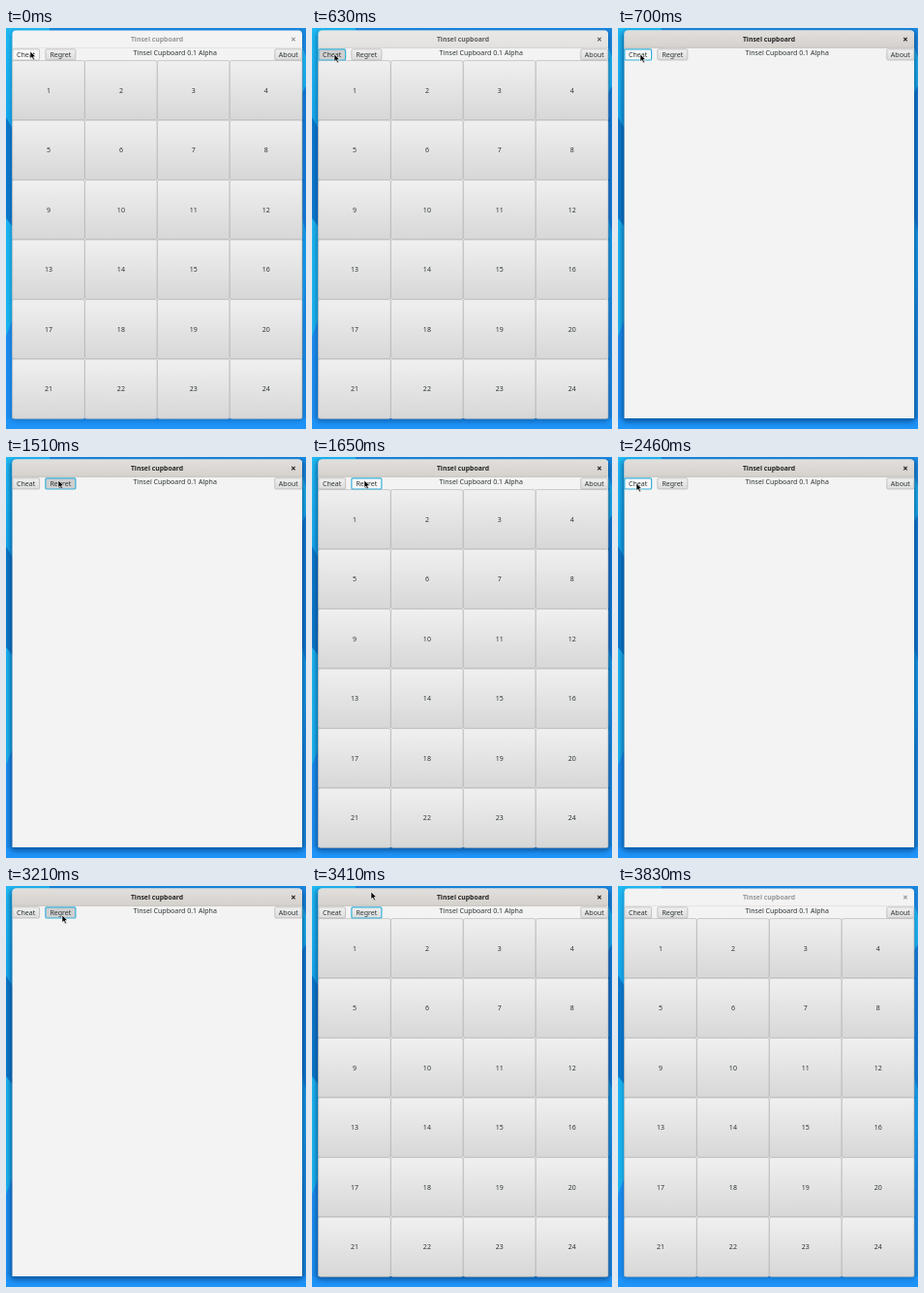
Recreate the animation shown at these times as an HTML page. Size 310x413 px, loop 3.86 s.

```html
<!DOCTYPE html>
<html lang="en">
<head>
<meta charset="utf-8">
<title>Tinsel cupboard</title>
<style>
  html, body { margin: 0; width: 100%; height: 100%; overflow: hidden; background: #1c8ff0; }
  svg { display: block; width: 310px; height: 413px; }
  text { font: 7.06px "Noto Sans", "Open Sans", sans-serif; fill: #2e3436; text-anchor: middle; }
  .title { font-weight: 700; font-size: 6.85px; }
  .shade { filter: blur(2.5px); }
</style>
</head>
<body>
<svg id="stage" viewBox="0 0 310 413">
  <defs>
    <linearGradient id="sky" x2="0" y2="1">
      <stop offset="0" stop-color="#20b9f2"/><stop offset=".22" stop-color="#17a9ee"/>
      <stop offset=".55" stop-color="#169be9"/><stop offset="1" stop-color="#2199fb"/>
    </linearGradient>
    <linearGradient id="bar" x2="0" y2="1">
      <stop stop-color="#e2dfdc"/><stop offset="1" stop-color="#d5d1cd"/>
    </linearGradient>
    <linearGradient id="cell" x2="0" y2="1">
      <stop stop-color="#f0f0f0"/><stop offset="1" stop-color="#d7d7d7"/>
    </linearGradient>
    <linearGradient id="btn" x2="0" y2="1">
      <stop stop-color="#f0f0f0"/><stop offset="1" stop-color="#dcdcdc"/>
    </linearGradient>
  </defs>

  <rect width="310" height="413" fill="url(#sky)"/>
  <path d="M45 0H310V413H300L310 250V30L300 4H45Z" fill="#1b88e0"/>
  <path d="M0 92L7 104V205L0 196Z" fill="#0c78cc"/>
  <path d="M0 196L7 205V300L0 318Z" fill="#1cb4f0"/>
  <path d="M0 318L7 300V413H0Z" fill="#1c8df0"/>
  <path d="M304 70L310 60V210L304 190Z" fill="#1379d4"/>
  <path d="M0 402H310V413H0Z" fill="#1e93f8"/>

  <rect class="shade" x="5" y="4" width="302" height="401" rx="4" fill="#04376e" opacity=".3"/>
  <rect id="deep" class="shade" x="4" y="4" width="304" height="402" rx="5" fill="#04376e" opacity=".4"/>

  <path d="M6.5 402V6.500Q6.500 2.500 10.500 2.500H302Q306 2.500 306 6.500V402Z" fill="#f3f3f3"/>
  <g id="active">
    <path d="M6.500 20.500V6.500Q6.500 2.500 10.500 2.500H302Q306 2.500 306 6.500V20.500Z" fill="url(#bar)"/>
    <path d="M6.500 20.300H306" stroke="#b5afa9" stroke-width=".7"/>
  </g>
  <path d="M6.500 20.400H306" stroke="#d0ceca" stroke-width=".5"/>
  <text id="title" class="title" x="156" y="14.300">Tinsel cupboard</text>
  <path id="close" d="M295.200 9.800l3.500 3.500m0-3.500l-3.500 3.500" stroke-width="1.100"/>
  <text x="174.700" y="27.600">Tinsel Cupboard 0.1 Alpha</text>
  <g id="cells"></g>
  <g id="buttons"></g>
  <path id="cursor" d="M0 0V7.600L1.800 6L3.100 8.900L4.500 8.300L3.200 5.500H5.600Z"
        fill="#000" stroke="#fff" stroke-width=".6" stroke-linejoin="round"/>
</svg>
<script>
const LOOP = 3860;
const $ = id => document.getElementById(id);

function add(parent, tag, attrs, label) {
  const el = document.createElementNS("http://www.w3.org/2000/svg", tag);
  for (const k in attrs) el.setAttribute(k, attrs[k]);
  if (label !== undefined) el.textContent = label;
  return parent.appendChild(el);
}

for (let i = 0; i < 24; i++) {
  const x = 6.6 + (i % 4) * 74.9, y = 33.6 + Math.floor(i / 4) * 61.5;
  add($("cells"), "rect", { x, y, width: 74.7, height: 61.3, rx: 1.8,
    fill: "url(#cell)", stroke: "#adadad", "stroke-width": .6 });
  add($("cells"), "text", { x: x + 37.4, y: y + 33.1 }, i + 1);
}

function makeButton(label, x, width) {
  const box = add($("buttons"), "rect", { x, y: 21.8, width, height: 11.2, rx: 1.3 });
  add($("buttons"), "text", { x: x + width / 2, y: 30 }, label);
  return { box, x, width };
}
const cheat = makeButton("Cheat", 6.8, 27.8);
const regret = makeButton("Regret", 40.9, 31);
const about = makeButton("About", 277.8, 28);

// Pointer moves: start, end, number of steps, x, y
const start = [25, 24];
const moves = [
  [70, 120, 2, 24, 25.5],
  [280, 320, 3, 23, 27],
  [900, 1400, 11, 54, 24],
  [1810, 2050, 7, 19, 27],
  [2610, 2800, 5, 53, 28],
  [2950, 3170, 6, 58, 30],
  [3290, 3460, 5, 63, -10]
];

// Clicks: press, release, button, whether the doors show afterwards
const clicks = [
  [630, 700, cheat, false],
  [1510, 1650, regret, true],
  [2360, 2460, cheat, false],
  [3210, 3290, regret, true]
];

function stepped(t, from, to, n) {
  if (t < from) return 0;
  return Math.min(1, (Math.floor((t - from) * (n - 1) / (to - from) + 1e-6) + 1) / n);
}

function pointer(t) {
  let [x, y] = start;
  for (const [from, to, n, nx, ny] of moves) {
    const p = stepped(t, from, to, n);
    x += (nx - x) * p;
    y += (ny - y) * p;
  }
  return [x, y];
}

function paint(b, hover, focus, pressed) {
  b.box.setAttribute("fill", pressed ? "#cfcfcf" : hover ? "#f8f8f8" : "url(#btn)");
  b.box.setAttribute("stroke", focus ? "#36b0da" : "#b1b1b1");
  b.box.setAttribute("stroke-width", focus ? 1.2 : .7);
}

function draw(t) {
  const [x, y] = pointer(t);
  let focus = null, pressed = null, doors = true;
  for (const [down, up, button, shown] of clicks) {
    if (t >= down) focus = button;
    if (t >= down && t < up) pressed = button;
    if (t >= up) doors = shown;
  }
  if (t >= 3510) focus = null;
  const active = stepped(t, 630, 700, 2) - stepped(t, 3510, 3830, 7);

  for (const b of [cheat, regret, about]) {
    const hover = x >= b.x && x <= b.x + b.width && y >= 21.8 && y <= 33;
    paint(b, hover, b === focus, b === pressed);
  }
  $("active").setAttribute("opacity", active);
  $("deep").setAttribute("opacity", .4 * active);
  const tone = Math.round(150 - 115 * active);
  const ink = `rgb(${tone},${tone},${tone})`;
  $("title").style.fill = ink;
  $("close").setAttribute("stroke", ink);
  $("cells").setAttribute("visibility", doors ? "visible" : "hidden");
  $("cursor").setAttribute("transform", `translate(${x} ${y})`);
}

const t0 = performance.now();
function tick() {
  draw((performance.now() - t0) % LOOP);
  requestAnimationFrame(tick);
}
tick();
</script>
</body>
</html>
```
